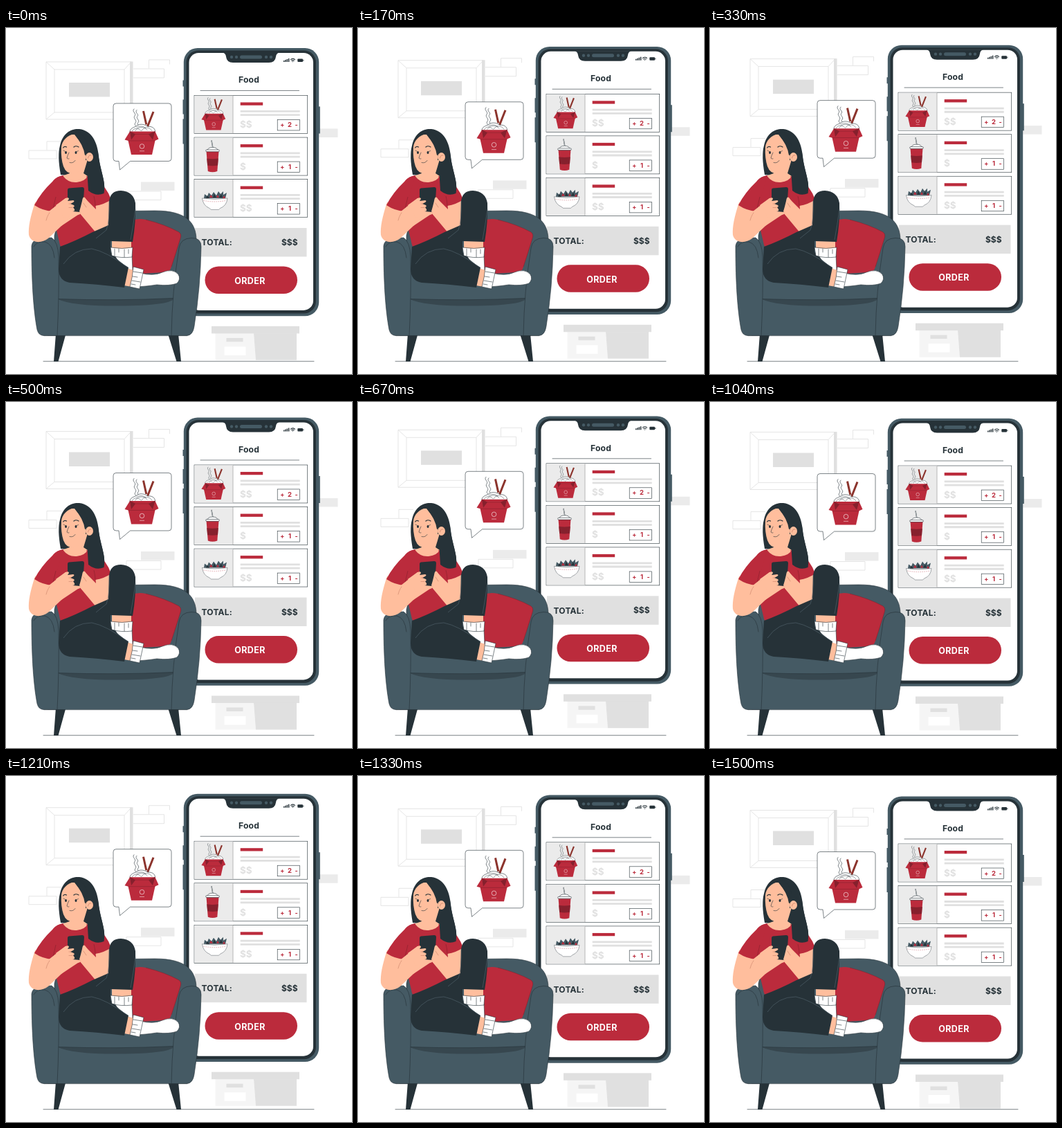
Recreate the animation shown at these times as an HTML page. Size 500 by 500 pixels, loop 1540 ms.

```html
<!DOCTYPE html>
<html lang="en">
<head>
<meta charset="utf-8">
<title>Food order</title>
<style>
  html, body { margin: 0; width: 100%; height: 100%; overflow: hidden; background: #fff; }
  svg { display: block; width: 100vw; height: 100vh; }
  text { font-family: Inter, "Open Sans", sans-serif; font-weight: 700; }
  .red { fill: #bb2b3c; }
  .deep { fill: #86202d; }
  .dark { fill: #263238; }
  .slate { fill: #455a64; }
  .skin { fill: #ffbe9d; }
  .white { fill: #fff; }
  .g1 { fill: #e0e0e0; }
  .g2 { fill: #ebebeb; }
  .g3 { fill: #f5f5f5; }
  .ink { stroke: #263238; stroke-width: .6; }
  .line { fill: none; stroke: #263238; stroke-width: .6; stroke-linecap: round; }
  .fold { fill: none; stroke: #86202d; stroke-width: .6; }
  .soft { fill: none; stroke: #e3e3e3; stroke-width: .9; }
  .seam { fill: none; stroke: #55666f; stroke-width: .6; }
</style>
</head>
<body>
<svg viewBox="0 0 500 500">
  <defs>
    <g id="box">
      <path class="line" d="M185 117.500c-4 4 4 6 1 10s4 6 1 10 3 4 1 7M189 119c-4 4 4 6 1 9s4 6 1 9 3 4 0 6"/>
      <path d="M198.500 120.500 202.800 140M213 121.500 204.500 143" stroke="#8c342d" stroke-width="3"/>
      <path class="white ink" d="M179 152C178 145 186 144 189 142C194 138 201 140 205 143C212 142 217 147 215 152Z"/>
      <path class="line" style="stroke-width:.45" d="M182 150c2-5 9-6 13-1M187 149c3-6 13-7 17-1M196 149c3-6 11-6 15 0M189 144c5-2 9-2 13 1"/>
      <path class="red" d="M176 161H216L211 183.500H181Z"/>
      <path class="red" d="M179 150H215.500L220.500 161 215 163.500H177L171.500 162Z"/>
      <path class="deep" d="M179 150 187 154 181 162ZM215.500 150 206 154 212 162Z"/>
      <path class="fold" d="M179 150 186 154H207L215.500 150M177 163.500H215"/>
      <circle cx="196.500" cy="171.500" r="3.300" fill="none" stroke="#fff" stroke-width=".6"/>
      <path d="M193 178.300h7" stroke="#eab4ba" stroke-width=".8"/>
    </g>
    <g id="cup">
      <path d="M297 162.500 299 174" stroke="#263238" stroke-width="1.300"/>
      <path d="M297 162.500 299 174" stroke="#fff" stroke-width=".6"/>
      <path class="white ink" d="M290.800 177Q292 172.500 298.500 172.500T306.200 177Z"/>
      <path class="red" d="M289.500 178H307.500L305.300 207Q298.500 209.500 291.800 207Z"/>
      <path class="deep" d="M290.300 188.500Q298 190 306.700 188.500L306 198.500Q298 200 291.100 198.500Z"/>
      <rect class="white ink" x="288.700" y="176" width="19.600" height="2.800" rx="1.300"/>
    </g>
    <g id="bowl">
      <path class="slate" d="M286 246 287 240 291 243 293 238 297 242 300 237 304 242 307 236 310 240 314 236 314 241 319 238 317 246Z"/>
      <path class="dark" d="M289 246l2-4 3 4ZM299 245l2-5 3 5ZM308 245l3-5 2 5Z"/>
      <path class="red" d="M294 245l2-4 3 4ZM304 245l2-4 2 4ZM313 246l2-4 2 4Z"/>
      <path class="white ink" style="stroke-width:.4" d="M283.500 246Q301 249 320 246Q319 257 309.500 260.500L307.500 262.500H296.500L294 260.500Q285 257 283.500 246Z"/>
      <path d="M285.500 249.500Q301 252.500 318 249.500" fill="none" stroke="#bb2b3c" stroke-width=".4" stroke-dasharray="1.500 1.500"/>
    </g>
  </defs>

  <g id="float">
    <g class="soft">
      <path d="M58 49.500H181V132.500H58ZM70 60.500H171V122.500H70ZM58 49.500 70 60.500M181 49.500 171 60.500M58 132.500 70 122.500M181 132.500 171 122.500"/>
      <path d="M206.500 59V46.500H236.500V53M184 59.500H228.500V72.500H184"/>
      <path d="M59 177V164.500H80M73 177.500H33V189.500H73ZM174 249V236.500H224V249Z"/>
    </g>
    <rect class="g1" x="179" y="49" width="4.500" height="84"/>
    <rect class="g1" x="91" y="79.500" width="59" height="20.500"/>
    <rect class="g2" x="195" y="223" width="48.500" height="12.500"/>
    <rect class="g2" x="445" y="146" width="34.500" height="12.500"/>

    <path class="g3" d="M302.500 441H358L361 480.500H302.500Z"/>
    <path class="g1" d="M358 441H420V480.500H361Z"/>
    <rect class="g1" x="297" y="431.500" width="127" height="10.500"/>
    <rect class="g1" x="318.500" y="448.500" width="24" height="5.500"/>
    <rect class="white" x="315.500" y="461" width="31" height="12.500"/>

    <path class="slate" d="M255.500 76h3v9h-3ZM255.500 104h3v21h-3ZM255.500 132h3v36h-3ZM451 114h2.800v39H451Z"/>
    <rect class="slate" x="256.800" y="29.600" width="195.400" height="387.200" rx="20"/>
    <rect class="dark" x="260.500" y="33" width="187.500" height="380" rx="17.500"/>
    <rect class="white" x="264.500" y="36.500" width="179.500" height="372" rx="14"/>
    <path class="dark" d="M313 36Q317.500 37 318 42Q319 50.500 328 50.500H380Q389 50.500 390 42Q390.500 37 395 36Z"/>
    <g class="slate">
      <rect x="338" y="40" width="32" height="5" rx="2.500"/>
      <circle cx="326" cy="42.500" r="2.200"/><circle cx="333" cy="42.500" r="2.200"/>
      <circle cx="376" cy="42.500" r="2.200"/><circle cx="383" cy="42.500" r="2.200"/>
    </g>
    <path class="dark" d="M401 47.500h1.500v2H401ZM403.300 46.500h1.500v3h-1.500ZM405.600 45.500h1.500v4h-1.500ZM407.900 44.500h1.500v5h-1.500Z"/>
    <path class="line" style="stroke-width:1.100" d="M411.500 46.200q3-2.500 6 0M412.800 47.800q1.700-1.300 3.400 0M414.500 49.200v.1"/>
    <rect class="dark" x="421.300" y="45" width="7.700" height="4.500" rx="1"/><path class="dark" d="M429.400 46.300h.9v2h-.9Z"/>
    <text class="dark" x="351" y="80" font-size="12.200" letter-spacing=".2" text-anchor="middle">Food</text>
    <path class="line" d="M281 91H423.500"/>

    <g id="cards"></g>
    <use href="#box" transform="translate(160.700 17.700) scale(.71)"/>
    <use href="#cup" y=".5"/>
    <use href="#bowl" y=".5"/>

    <rect class="g1" x="273" y="289.500" width="161.500" height="41.500"/>
    <text class="dark" x="282.500" y="315" font-size="12" letter-spacing=".2">TOTAL:</text>
    <text class="dark" x="421.500" y="314.700" font-size="12" text-anchor="end">$$$</text>
    <rect class="red" x="287.500" y="345" width="133.500" height="39.500" rx="19.700"/>
    <text class="white" x="352.500" y="370.300" font-size="12.500" letter-spacing=".4" text-anchor="middle">ORDER</text>

    <path class="white ink" d="M159 109.500H235Q239 109.500 239 113.500V189Q239 193 235 193H179.500L164.500 205.500 163 193H159Q155 193 155 189V113.500Q155 109.500 159 109.500Z"/>
    <use href="#box"/>
  </g>

  <path class="line" d="M54 481.700H445"/>

  <g id="chair">
    <path class="dark" d="M72 442H86.500L75.500 482H69ZM234 442H249L253 482H246.500Z"/>
    <path class="slate ink" d="M70 400V300Q75 268 130 265L215 264C262 264 274 282 275 305L268 400Z"/>
    <path class="red" d="M181 279Q190 274 202 277Q230 284 250 295Q254 298 252 304Q246 325 239 345Q237 353 229 353L178 356Z"/>
    <path class="fold" d="M202 277Q230 284 250 295Q254 298 252 304L239 345"/>
    <path class="slate" d="M60 366H250V444.500H60Z"/>
    <path d="M74 391.500Q160 394.500 243 390.500Q240 399 190 401Q100 404 74 391.500Z" fill="#37474f"/>
    <path class="line" d="M74 391.500Q160 394.500 243 390.500M55 444.700H262"/>
    <path class="slate ink" d="M37 315Q38 305 52 303.500L66 303Q75 309 76 330Q77 385 74 444.500H54Q47 444 45 436C40 410 37 370 37 315Z"/>
    <path class="slate ink" d="M250 318Q252 304 268 303.500Q282 303 282 316Q281 375 272 431Q270 444.500 261 444.500H239Q240 380 250 318Z"/>
    <path class="line" d="M40 316Q44 308 56 309Q68 312 70 332"/>
  </g>

  <g id="woman">
    <path class="dark" d="M79 212Q74 184 78 170C82 151 95 145 106 146C124 148 132 165 134 185C136 207 145 222 141.500 239Q130 244 119 236L105 215Z"/>
    <path class="red" d="M83 213Q74 214 68 221L64 255 77 309Q78 318 84 319L146 297 140 240 130 218 116 214Z"/>
    <path class="skin" d="M92 200V210L82 213.500Q90 224 102 223Q115 221 118 214L112 210 118 190Z"/>

    <path class="skin" d="M42 252C35 273 32 288 33 299C36 311 51 312 61 304L96 271 88 249 67 262V254Z"/>
    <path class="line" style="stroke:#c98268" d="M67 262Q60 269 58 278"/>
    <path class="skin" d="M113 245 130 262 129 250 151 244C152 264 150 285 146 298Q137 303 131 297L106 267Z"/>
    <path class="red" d="M83 213Q74 214 68 221Q50 238 41 256Q53 264 67 265Q72 252 76 236Z"/>
    <path class="red" d="M116 214Q134 218 143 231Q149 239 152 248Q142 255 129 257L124 235Z"/>
    <path class="fold" d="M67 265Q70 253 72 244M129 257Q129 250 127 243"/>

    <path class="dark" d="M113 170 133 180C136 207 145 222 141.500 239Q130 244 119 235Q117 215 118 195Z"/>
    <path class="skin" d="M80 172C81 163 88 155 99 153C105 163 112 169 115 178L115 194Q111 208 98 210.500Q87 211 83 200Q79 188 80 172Z"/>
    <path class="dark" d="M92 154 103 150Q118 155 119 180L114 184Q112 169 99 154Z"/>
    <ellipse class="skin" cx="120.500" cy="186.500" rx="5.500" ry="6.500"/>
    <path class="line" style="stroke:#b9735b" d="M118.500 188Q119 183 123 184"/>
    <path class="line" style="stroke-width:1.200" d="M82.500 173Q84.500 170.500 87.500 172M98 172Q101 169.500 105 172"/>
    <ellipse class="dark" cx="86.500" cy="180" rx="1.500" ry="2"/>
    <ellipse class="dark" cx="101" cy="180" rx="1.500" ry="2"/>
    <path class="line" d="M91 180Q88.500 185 88 188Q89 189.500 91 189M92 194.500Q97 196 100 191.500M85 178l-2-1M102.500 178.500l2-1"/>

    <path class="white ink" d="M157 328H182L183 350H168Z"/>
    <path class="skin" d="M153 302H181V319H153Z"/>
    <path class="skin" d="M166 344 184 350 182 374 164 371Z"/>
    <path class="dark" d="M149 250Q151 235 166 235Q184 236 187 253Q188 280 183 309L151 308V324Q163 338 177 346L171 375Q130 370 92 368Q76 365 76 348L78 316Q100 308 125 295L148 285Z"/>
    <path class="seam" d="M149 250Q150 278 145 292L130 304M83 341Q98 319 124 319Q145 323 176 346M187 262Q184 285 180 306"/>
    <path class="white ink" d="M151 317Q168 320 183 317L182 331Q166 333 153 329Z"/>
    <path class="line" d="M157 319v10M163 319v5M171 320v11M177 320v6"/>
    <path class="white ink" d="M194 354Q213 359 226 353Q241 347 249 356Q253 363 247 369Q236 373 218 371Q206 373 190 374Z"/>
    <path class="white ink" d="M184 345 199 349Q196 363 193 377L179 374Q183 360 184 345Z"/>
    <path class="line" d="M184 352l13 2M183 359l7 1M182 365l12 2M181 370l6 1"/>

    <path class="skin" d="M62 265 86 246Q92 245 96 252L108 264 104 270 80 286Z"/>
    <path class="dark" d="M91 231.500 110 230Q113 230 113 233L111 264Q111 267 107 267L92 268Q89 268 89 265V234Q89 231.500 91 231.500Z"/>
    <path class="skin" d="M72 256 86 246Q91 244 91 247L89 250 97 249Q100 250 97 252L93 254 98 256Q100 258 97 259L99 262Q100 265 96 265L107 266Q109 269 104 270L84 274Z"/>
    <path class="skin" d="M110 250Q111 243 114 245L122 256 126 266 110 271 106 265 108 258Z"/>
    <path class="line" style="stroke:#c98268" d="M91 254h3M91 259.500h5M112 253l4 6"/>
  </g>
</svg>
<script>
  const card = (y, price, count) => `
    <g transform="translate(0 ${y})">
      <rect class="white ink" x="272" width="163.700" height="55"/>
      <rect class="g2" x="272.400" y=".4" width="55.600" height="54.200"/>
      <path d="M328 .5V54.500" stroke="#a8a8a8" stroke-width=".8"/>
      <rect class="red" x="338.700" y="10" width="32.500" height="4.300"/>
      <path class="g1" d="M338.700 21.500h86v2.800h-86ZM338.700 26.700h86v2.800h-86Z"/>
      <text class="g1" x="338" y="46.700" font-size="13.500">${price}</text>
      <rect class="white ink" x="392.200" y="35" width="32.300" height="15.500"/>
      <g class="red" font-size="9" text-anchor="middle">
        <text x="399.300" y="45.700">+</text><text x="410" y="45.700" font-size="9.500">${count}</text><text x="419.700" y="45.700">-</text>
      </g>
    </g>`;
  document.getElementById('cards').innerHTML =
    card(98, '$$', 2) + card(158.600, '$', 1) + card(219.100, '$$', 1);

  // Linear bob of 10 units, shown in 37 even steps per loop.
  const steps = 37;
  document.getElementById('float').animate(
    { transform: ['translateY(0px)', 'translateY(-10px)', 'translateY(0px)'] },
    { duration: 1540, iterations: Infinity, iterationStart: 1.1 / steps, easing: `steps(${steps})` }
  );
</script>
</body>
</html>
```
